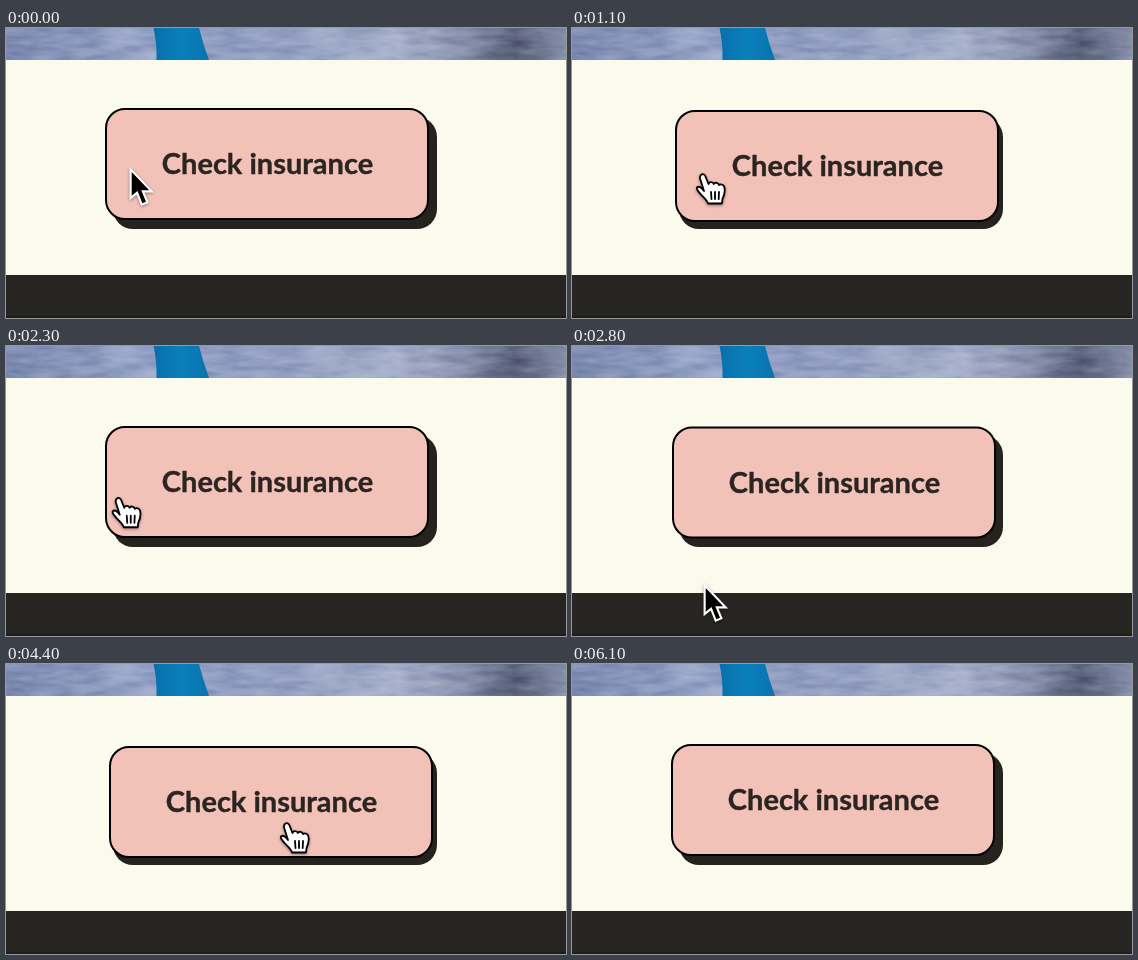
These frames come from a looping animation (560x290 px, 7 s). An HTML page:

```html
<!DOCTYPE html>
<html lang="en">
<head>
<meta charset="utf-8">
<title>Button hover</title>
<style>
  html, body { margin: 0; width: 100%; height: 100%; overflow: hidden; background: #fbfbed; }
  svg { display: block; width: 560px; height: 290px; }
  .label { font: 700 29px Lato, "Open Sans", sans-serif; fill: #2a2521; stroke: #2a2521; stroke-width: .4; text-anchor: middle; }
  #cursor { filter: drop-shadow(0 1px 1.5px rgba(0, 0, 0, .4)); }
</style>
</head>
<body>
<svg viewBox="0 0 560 290">
  <defs>
    <linearGradient id="fabric">
      <stop offset="0" stop-color="#7f8cb0"/>
      <stop offset=".25" stop-color="#97a4c6"/>
      <stop offset=".4" stop-color="#8f9cbe"/>
      <stop offset=".7" stop-color="#a4aec8"/>
      <stop offset=".82" stop-color="#8b94ad"/>
      <stop offset=".91" stop-color="#575e75"/>
      <stop offset="1" stop-color="#8790a9"/>
    </linearGradient>
    <linearGradient id="strap">
      <stop offset="0" stop-color="#086fab"/>
      <stop offset=".5" stop-color="#0a80bb"/>
      <stop offset="1" stop-color="#0973ae"/>
    </linearGradient>
    <filter id="weave" x="0" y="0" width="1" height="1" color-interpolation-filters="sRGB">
      <feTurbulence type="fractalNoise" baseFrequency=".03 .12" numOctaves="3" seed="4"/>
      <feColorMatrix values="1 0 0 0 0  1 0 0 0 0  1 0 0 0 .04  0 0 0 0 1"/>
    </filter>
  </defs>

  <rect width="560" height="290" fill="#fbfbed"/>
  <rect width="560" height="32" fill="url(#fabric)"/>
  <rect width="560" height="32" filter="url(#weave)" opacity=".5" style="mix-blend-mode: soft-light"/>
  <path d="M147.500 0H193Q197 16 203 32H150.500Q151 16 147.500 0Z" fill="url(#strap)"/>
  <rect y="247" width="560" height="43" fill="#262521"/>
  <rect y="288" width="560" height="2" fill="#1e1d19"/>

  <rect x="107" y="89" width="324" height="112" rx="20" fill="#26221e"/>
  <g id="button">
    <rect x="100" y="81" width="322" height="110" rx="19" fill="#f2c1b7" stroke="#000" stroke-width="2"/>
    <text class="label" x="261.5" y="146">Check insurance</text>
  </g>

  <g id="cursor">
    <path id="arrow" transform="translate(.7 0) scale(1.06)" d="M0 0V22.5L5.500 18L10 29.500L13.500 28L9 17.300H16.500Z"
      stroke="#fff" stroke-width="4" paint-order="stroke"/>
    <g id="hand" transform="translate(-6 -2)" stroke="#000" stroke-width="1.800" stroke-linejoin="round" stroke-linecap="round">
      <path fill="#fff" d="M8 19L4.200 7C3 2 8 .5 9.500 4.500L12.500 12C13 9.500 17 9.500 17.800 12C19 10 22.500 10.500 23 13C25 11.500 28.500 13 28.500 16C29.500 21 28 24 26.500 27L26 31.500H12C11 28 7 25 4.500 22C3 19.500 0 18 1 15.500C3 13.500 6 16 8 19Z"/>
      <path fill="none" d="M15 20L15.500 27M19 20V27M23 20L22.700 27"/>
    </g>
  </g>
</svg>
<script>
const LOOP = 7000, STEP = 100, PRESS_MS = 200;
const easeOut = k => 1 - (1 - k) ** 2;
const easeIn = k => k * k;

const start = { x: 125, y: 144 };
const moves = [
  { from: 500, to: 700, x: 67, y: 154 },
  { from: 700, to: 1100, x: 130, y: 146 },
  { from: 1600, to: 1900, x: 51, y: 151 },
  { from: 2100, to: 2500, x: 132, y: 152 },
  { from: 2600, to: 2800, x: 133, y: 242 },
  { from: 3300, to: 3600, x: 137, y: 191 },
  { from: 3600, to: 4100, x: 224, y: 138 },
  { from: 4100, to: 4400, x: 280, y: 159 },
  { from: 5400, to: 6000, x: 286, y: -45, ease: easeIn }
];
const hovers = [[900, 1700], [2300, 2700], [3700, 5800]];

const $ = id => document.getElementById(id);
const button = $('button'), cursor = $('cursor'), arrow = $('arrow'), hand = $('hand');

const progress = (t, from, to) => Math.min(1, Math.max(0, (t - from) / (to - from)));
const pressRamp = (t, from) => easeOut(progress(t, from, from + PRESS_MS));
const place = (el, x, y) => el.setAttribute('transform', `translate(${x} ${y})`);
const show = (el, on) => { el.style.display = on ? '' : 'none'; };

function pointerAt(t) {
  let { x, y } = start;
  for (const move of moves) {
    const k = (move.ease || easeOut)(progress(t, move.from, move.to));
    x += (move.x - x) * k;
    y += (move.y - y) * k;
  }
  return [x, y];
}

function draw(now) {
  // The pointer and button advance ten times a second.
  const t = Math.floor(now % LOOP / STEP) * STEP;
  const press = hovers.reduce((sum, [on, off]) => sum + pressRamp(t, on) - pressRamp(t, off), 0);
  const over = hovers.some(([on, off]) => t >= on && t < off);
  place(button, 4 * press, 2 * press);
  place(cursor, ...pointerAt(t));
  show(hand, over);
  show(arrow, !over);
}

function tick() {
  draw(performance.now());
  requestAnimationFrame(tick);
}
tick();
</script>
</body>
</html>
```
